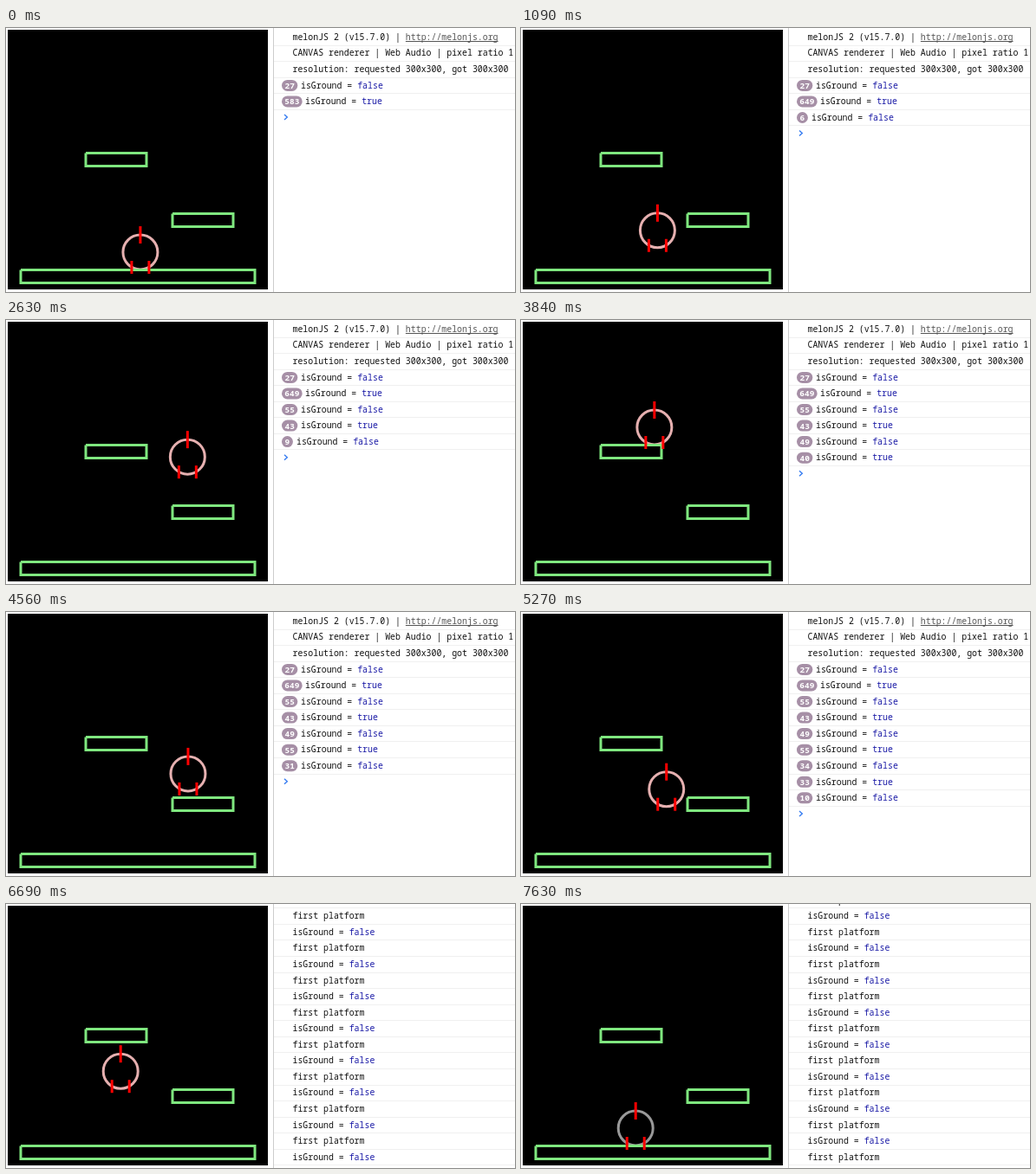
Write an HTML page with a canvas that moves like this. It is 587 by 305 pixels and loops after 8680 ms.

```html
<!DOCTYPE html>
<html lang="en">
<head>
<meta charset="utf-8">
<title>Ball and platforms</title>
<style>
  html, body { margin: 0; width: 100%; height: 100%; overflow: hidden; background: #fff; }
  canvas { display: block; }
</style>
</head>
<body>
<canvas id="stage" width="587" height="305"></canvas>
<script>
const ctx = document.getElementById('stage').getContext('2d');
const LOOP = 8680, PAUSE = 7630, ROW = 18.56;
const GRAVITY = 0.095, JUMP = 3.8, WALK = 1.2;
const START = { x: 155, y: 259 };
const FIRST_COUNT = 583, BUMP = 407, BUMP_TICKS = 24;

// Arrow keys held: from tick, to tick, direction.
const KEYS = [[0, 12, -1], [42, 56, 1], [75, 126, 1], [166, 230, -1], [243, 303, 1], [307, 375, -1]];

// Time spent off the ground: takeoff and landing as sensed by the feet, and the landing height.
const FLIGHTS = [
  { up: 66, down: 121, to: 194, speed: JUMP },
  { up: 164, down: 213, to: 124, speed: JUMP },
  { up: 268, down: 302, to: 194, speed: 0 },
  { up: 335, down: 367, to: 259, speed: 0 },
  { up: 381, down: 460, to: 259, speed: JUMP },
];

const clamp = (v, low, high) => Math.max(low, Math.min(v, high));

// The game slows down a little as it goes on.
const tickAt = ms => 0.0661 * ms - (ms / 4000) ** 4;

const ballX = tick => KEYS.reduce(
  (x, [from, to, dir]) => x + dir * WALK * clamp(tick - from, 0, to - from), START.x);

function ballY(tick) {
  let floor = START.y, y = floor;
  for (const { up, to, speed } of FLIGHTS) {
    // The feet reach below the ball, so they sense the takeoff late.
    const n = tick - up + (speed ? 1.2 : 4.6);
    if (n < 0) break;
    y = floor - speed * n + GRAVITY / 2 * n * n;
    if (n > speed / GRAVITY) y = Math.min(y, to);
    floor = to;
  }
  return y;
}

function line(color, width, ...points) {
  ctx.strokeStyle = color;
  ctx.lineWidth = width;
  ctx.beginPath();
  for (const [x, y] of points) ctx.lineTo(x, y);
  ctx.stroke();
}

function platform(x, y, w) {
  line('#7fe77f', 3, [x, y], [x + w, y], [x + w, y + 15], [x, y + 15], [x, y]);
}

function drawGame(tick, paused) {
  const x = ballX(tick), y = ballY(tick);
  ctx.fillStyle = '#000';
  ctx.fillRect(2, 2, 300, 300);

  ctx.strokeStyle = paused ? '#999' : '#e6b0b0';
  ctx.lineWidth = 3;
  ctx.beginPath();
  ctx.arc(x, y, 20, 0, 2 * Math.PI);
  ctx.stroke();

  platform(92, 144.5, 70);
  platform(192, 214.5, 70);
  platform(17, 279.5, 270);

  const ray = (dx, top, bottom) => line('#f00', 3, [x + dx, y + top], [x + dx, y + bottom]);
  ray(0, -30, -10);
  ray(-10, 10, 25);
  ray(10, 10, 25);
}

function consoleRows(tick) {
  const now = Math.floor(tick);
  const rows = [
    { text: 'melonJS 2 (v15.7.0) | ', link: 'http://melonjs.org' },
    { text: 'CANVAS renderer | Web Audio | pixel ratio 1' },
    { text: 'resolution: requested 300x300, got 300x300' },
  ];
  const ground = (value, count = 1) => {
    if (count > 0) rows.push({ text: 'isGround = ', value: String(value), count });
  };

  ground(false, 27);
  let landed = -FIRST_COUNT;
  for (const { up, down } of FLIGHTS) {
    ground(true, Math.min(now, up) - landed);
    ground(false, Math.min(now, down, BUMP) - up);
    landed = down;
  }
  // Touching the platform from below logs a pair of rows every tick.
  for (let i = clamp(now - BUMP, 0, BUMP_TICKS); i > 0; i--) {
    rows.push({ text: 'first platform' });
    ground(false);
  }
  if (now >= landed) ground(true);
  return rows;
}

function drawBadge(count, y) {
  const digits = String(count);
  const width = 7.5 + 5.4 * digits.length;
  ctx.fillStyle = '#a68fa6';
  ctx.beginPath();
  ctx.roundRect(318, y - 6, width, 13, 6.5);
  ctx.fill();
  ctx.fillStyle = '#fff';
  ctx.font = 'bold 9.5px "Noto Sans Mono", monospace';
  ctx.textAlign = 'center';
  ctx.fillText(digits, 318 + width / 2, y + 4);
  ctx.textAlign = 'left';
  return 330 + 5 * digits.length;
}

function drawRow({ text, value = '', link = '', count = 1 }, y) {
  let x = count > 1 ? drawBadge(count, y) : 330.5;
  ctx.font = '9.9px "Noto Sans Mono", monospace';
  const write = (part, color) => {
    ctx.fillStyle = color;
    ctx.fillText(part, x, y + 3.7);
    x += ctx.measureText(part).width;
  };
  write(text, '#111');
  write(value, '#1a1aa6');
  if (link) {
    const left = x;
    write(link, '#555');
    ctx.fillRect(left, Math.round(y + 5), x - left, 1);
  }
  ctx.fillStyle = '#f0f0f0';
  ctx.fillRect(309, Math.round(y + 9.32), 278, 1);
}

function drawConsole(tick) {
  const rows = consoleRows(tick);
  // Three rows, the prompt among them, stay below the visible part.
  const scroll = Math.max(0, 10.2 + ROW * (rows.length - 3) - 292);
  const rowY = i => 10.2 + ROW * i - scroll;

  rows.forEach((row, i) => drawRow(row, rowY(i)));
  const y = rowY(rows.length);
  line('#367cf1', 1.4, [321, y - 3], [324.3, y], [321, y + 3]);
  ctx.fillStyle = '#ccc';
  ctx.fillRect(308, 0, 1, 305);
}

const begin = performance.now();
(function frame() {
  const ms = (performance.now() - begin) % LOOP;
  const tick = Math.min(tickAt(Math.min(ms, PAUSE)), 460);
  ctx.fillStyle = '#fff';
  ctx.fillRect(0, 0, 587, 305);
  drawConsole(tick);
  drawGame(tick, ms >= PAUSE);
  requestAnimationFrame(frame);
})();
</script>
</body>
</html>
```
